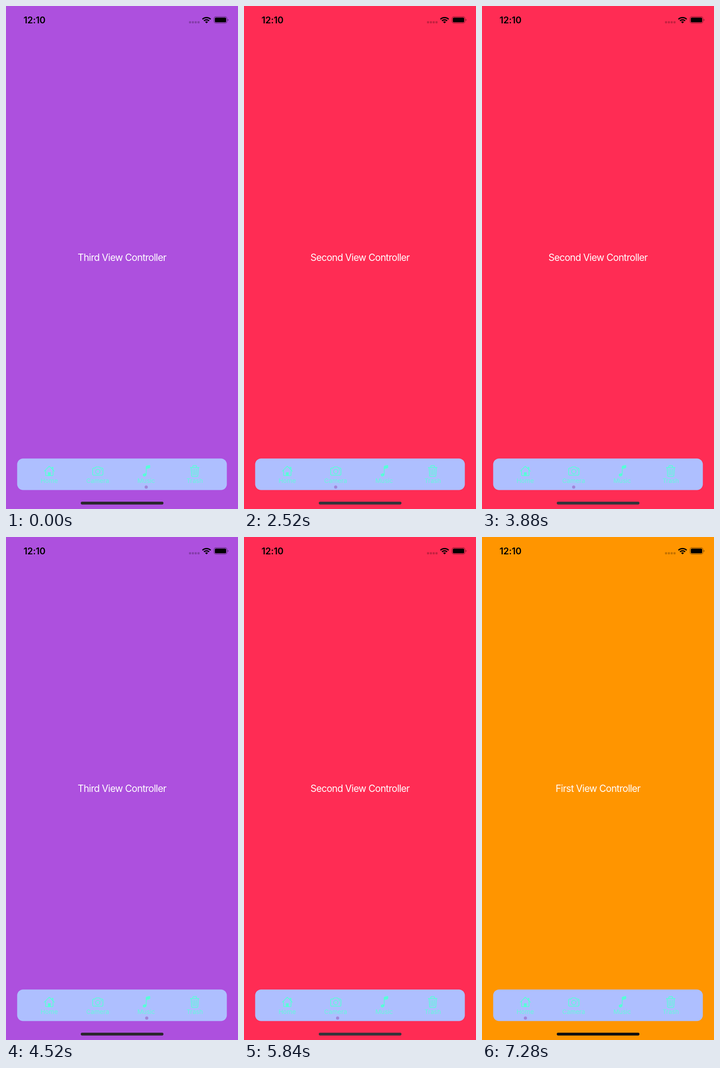
An HTML page that plays this animation: 509 by 1101 pixels, repeating every 7.32 s.

```html
<!DOCTYPE html>
<html lang="en">
<head>
<meta charset="utf-8">
<title>Tab bar</title>
<style>
  html, body { margin: 0; width: 100%; height: 100%; overflow: hidden; }
  svg { display: block; width: 100%; height: 100%; font-family: Inter, sans-serif; }
  .title { font-size: 21px; letter-spacing: -.73px; fill: #fff; text-anchor: middle; }
  .clock { font-size: 20px; font-weight: 600; letter-spacing: -.2px; }
  .labels { font-size: 13.6px; fill: #62fbdc; text-anchor: middle; }
  .icons { fill: none; stroke: #58ffd8; stroke-width: 1.6; stroke-linecap: round; stroke-linejoin: round; }
  .icons .solid { fill: #58ffd8; }
</style>
</head>
<body>
<svg viewBox="0 0 509 1101">
  <rect id="page" width="509" height="1101"/>

  <text class="clock" x="38.5" y="37.5">12:10</text>
  <g fill-opacity=".23">
    <rect x="401.5" y="33.3" width="4.6" height="4.6" rx="1.2"/>
    <rect x="407.7" y="33.3" width="4.6" height="4.6" rx="1.2"/>
    <rect x="413.9" y="33.3" width="4.6" height="4.6" rx="1.2"/>
    <rect x="420.1" y="33.3" width="4.6" height="4.6" rx="1.2"/>
  </g>
  <g fill="none" stroke="#000" stroke-width="2.8">
    <path d="M431 28.9a13 13 0 0 1 18 0"/>
    <path d="M434.4 32.4a8 8 0 0 1 11.2 0"/>
  </g>
  <path d="M440 38l-3.1-3.1a4.5 4.5 0 0 1 6.2 0z"/>
  <rect x="456.3" y="23.3" width="28.6" height="14.4" rx="4.4" fill="none" stroke="#000" stroke-opacity=".42" stroke-width="1.2"/>
  <rect x="458.2" y="25.2" width="24.8" height="10.6" rx="2.6"/>
  <path d="M486.3 28.2q1.8.7 1.8 2.3t-1.8 2.3z" fill-opacity=".48"/>

  <text id="title" class="title" x="254.5" y="558"></text>

  <rect x="24.5" y="990.5" width="460" height="69" rx="13" fill="#aebfff"/>
  <g class="icons">
    <g>
      <path d="M83.9 1018.2L95 1007.4l11.1 10.8M86.8 1015.6v10.6q0 1.8 1.8 1.8h12.8q1.8 0 1.8-1.8v-10.6M103.2 1014.6v-4.8h-2.2v2.6"/>
      <path class="solid" d="M92.6 1027.6v-6.4h4.8v6.4z"/>
    </g>
    <g>
      <path d="M192.4 1011.4h3l1.6-2q.5-.6 1.4-.6h6q.9 0 1.4.6l1.6 2h3q2.2 0 2.2 2.2v11.2q0 2.2-2.2 2.2h-18q-2.2 0-2.2-2.2v-11.2q0-2.2 2.2-2.2z"/>
      <circle cx="201.4" cy="1019" r="4.8"/>
      <circle class="solid" cx="209" cy="1015" r=".5"/>
    </g>
    <g>
      <ellipse class="solid" cx="304" cy="1026.3" rx="3.3" ry="2.5" transform="rotate(-18 304 1026.3)"/>
      <path d="M307.6 1025.5V1008"/>
      <path class="solid" d="M307.6 1008.2q0-1 1-1.2l6.2-1.4q.8-.1.8.7v3.6q0 .8-.8 1l-7.2 1.7z"/>
    </g>
    <g>
      <path d="M404.4 1010.4h19.2M410 1010v-2.2q0-2 2-2h4q2 0 2 2v2.2M406.2 1010.6l1 17.2q.1 2 2.1 2h9.4q2 0 2.1-2l1-17.2"/>
      <path d="M410.3 1014l.4 12.2M414 1014v12.2M417.7 1014l-.4 12.2" stroke-width="1.4"/>
    </g>
  </g>
  <g class="labels">
    <text x="94.8" y="1043.6">Home</text>
    <text x="201.2" y="1043.6">Camera</text>
    <text x="307.6" y="1043.6">Music</text>
    <text x="414" y="1043.6">Trash</text>
  </g>
  <circle id="dot" cy="1053" r="3.5" fill="#a086d8"/>
  <rect id="indicator" x="164" y="1085" width="181.5" height="6.2" rx="3.1"/>
</svg>

<script>
const LOOP = 7320, STEP = 40;

// lead: how far (in seconds) the dot's spring has run when the page appears
const tabs = [
  { title: 'First View Controller',  color: '#ff9500', indicator: '#111111', x: 94.8,  lead: .11 },
  { title: 'Second View Controller', color: '#ff2c54', indicator: '#35343a', x: 201.2, lead: .149 },
  { title: 'Third View Controller',  color: '#ad50de', indicator: '#29262c', x: 307.6, lead: .056 },
];
// Each switch goes to the next tab, starting from the third.
const switches = [1480, 2200, 2840, 3200, 3880, 4280, 5000, 5760, 6360, 7000];

const [page, title, dot, indicator] =
  ['page', 'title', 'dot', 'indicator'].map(id => document.getElementById(id));

function spring(t) {
  const decay = 15.4, freq = 15.71;
  return 1 - Math.exp(-decay * t) * (Math.cos(freq * t) + decay / freq * Math.sin(freq * t));
}

function render(ms) {
  const count = switches.filter(start => start <= ms).length;
  const tab = tabs[(count + 2) % 3];
  let x = tab.x;
  if (count) {
    const from = tabs[(count + 1) % 3].x;
    x = from + (tab.x - from) * spring((ms - switches[count - 1]) / 1000 + tab.lead);
  }
  page.setAttribute('fill', tab.color);
  indicator.setAttribute('fill', tab.indicator);
  title.textContent = tab.title;
  dot.setAttribute('cx', x.toFixed(2));
}

const begin = performance.now();
function tick() {
  const elapsed = (performance.now() - begin) % LOOP;
  render(Math.floor(elapsed / STEP) * STEP);
  requestAnimationFrame(tick);
}
tick();
</script>
</body>
</html>
```
